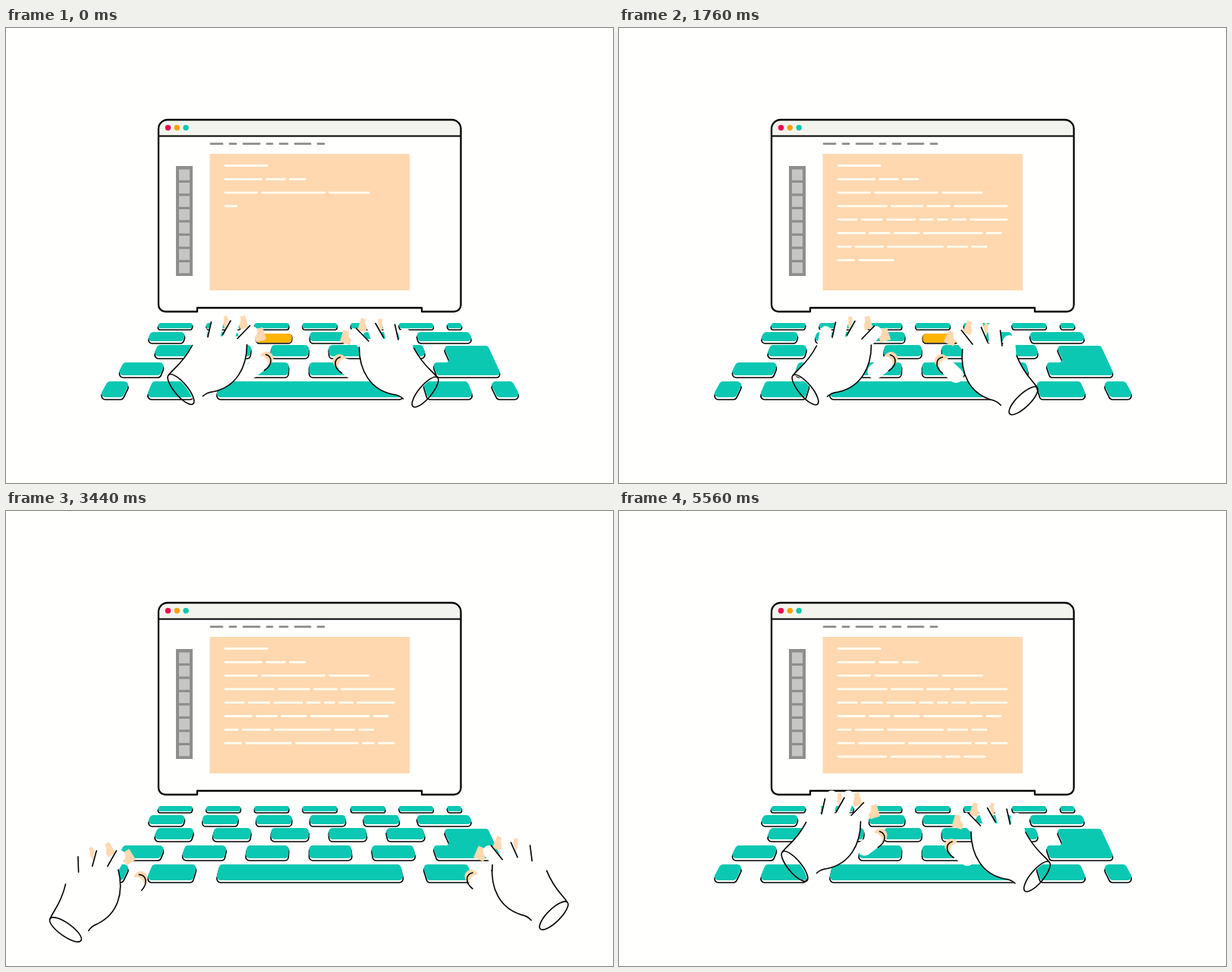
An HTML page with a canvas that plays this animation: 800x600 px, repeating every 5.6 s.

```html
<!DOCTYPE html>
<html lang="en">
<head>
<meta charset="utf-8">
<title>Typing hands</title>
<style>
html, body { margin: 0; width: 100%; height: 100%; overflow: hidden; background: #fffffd; }
canvas { display: block; }
</style>
</head>
<body>
<canvas id="stage" width="800" height="600"></canvas>
<script>
const ctx = document.getElementById('stage').getContext('2d');
const LOOP = 5600;
const PAPER = '#fffffd', INK = '#000', TEAL = '#0ac8b2', AMBER = '#ffb400';
const PEACH = '#ffd8b0', GREY = '#8e8e8c', SILVER = '#c6c6c4', MIST = '#f4f4ee';

// Letter rows: evenly spaced keys, the last one ends at `right`
const rows = [
  { top: 389, bottom: 398, left: 202, pitch: 63, width: 45, count: 7, right: 599 },
  { top: 401, bottom: 416, left: 191, pitch: 69.8, width: 46.5, count: 6, right: 610 },
  { top: 418, bottom: 436, left: 200, pitch: 75, width: 49, count: 5, right: 549 },
  { top: 441, bottom: 461, left: 155, pitch: 81.5, width: 55, count: 5, right: 536 }
];
const presses = [
  { at: 0, row: 1, key: 2 },
  { at: 1000, row: 0, key: 4 },
  { at: 1680, row: 1, key: 3 }
];
const HOLD = 140;

const lineWidths = [57, 107, 191, 224, 224, 216, 197, 224, 195];
const lines = lineWidths.map((width, row) => words(width, row));
const FIRST_TYPED = 3, LAST_LINE = 8;

// Wrist position and turn in degrees for each hand
const awayLeft = [78.5, 552, -14.5], awayRight = [722, 533.5, 5.5];
const poses = [
  { t: 0, hands: [[230.5, 476.5, 0], [552.5, 480, 0]] },
  { t: 1080, hands: [[180, 488, -5], [544, 475, 4]] },
  { t: 1760, hands: [[245.5, 477, 0], [533, 491.5, 6]] },
  { t: 2400, hands: [[209, 500.5, -9], [662.5, 524, 8]] },
  { t: 2900, hands: [awayLeft, awayRight] },
  { t: 3950, hands: [awayLeft, awayRight] },
  { t: 4280, hands: [[200, 468.5, -1], [564, 482.5, -1.5]] },
  { t: 5560, hands: [[231.5, 468.5, 0], [551, 482, 0]] }
];
poses.push({ t: LOOP, hands: poses[0].hands });

const clamp = u => Math.max(0, Math.min(1, u));

function random(seed) {
  const s = Math.sin(seed * 12.9898) * 43758.5453;
  return s - Math.floor(s);
}

// Splits a line into words of varied length
function words(width, row) {
  const list = [];
  for (let x = 0, i = 1; x < width; i++) {
    let end = x + 14 + 72 * random(row * 17 + i) ** 1.6;
    if (end > width - 16) end = width;
    list.push([x, end]);
    x = end + 5;
  }
  return list;
}

// Smooth curve through the poses that never overshoots
function poseValue(t, i, pick) {
  const slope = n => {
    const a = poses[n], b = poses[n + 1];
    return a && b ? (pick(b) - pick(a)) / (b.t - a.t) : 0;
  };
  const tangent = n => {
    const p = slope(n - 1), q = slope(n);
    return p * q > 0 ? 2 * p * q / (p + q) : 0;
  };
  const a = poses[i], b = poses[i + 1], span = b.t - a.t;
  const u = (t - a.t) / span, v = 1 - u;
  return v * v * (1 + 2 * u) * pick(a) + u * u * (3 - 2 * u) * pick(b)
    + span * u * v * (v * tangent(i) - u * tangent(i + 1));
}

function stroke(color, width) {
  ctx.strokeStyle = color;
  ctx.lineWidth = width;
  ctx.stroke();
}

function fill(color) {
  ctx.fillStyle = color;
  ctx.fill();
}

function bar(x1, y1, x2, y2, color, width) {
  ctx.beginPath();
  ctx.moveTo(x1, y1);
  ctx.lineTo(x2, y2);
  stroke(color, width);
}

function dot(x, y, r, color) {
  ctx.beginPath();
  ctx.arc(x, y, r, 0, Math.PI * 2);
  fill(color);
}

function rounded(pts, r) {
  const n = pts.length, last = pts[n - 1], first = pts[0];
  ctx.beginPath();
  ctx.moveTo((last[0] + first[0]) / 2, (last[1] + first[1]) / 2);
  pts.forEach((p, i) => {
    const q = pts[(i + 1) % n];
    ctx.arcTo(p[0], p[1], q[0], q[1], r);
  });
  ctx.closePath();
}

// Keys widen towards the viewer in proportion to their depth
function drawKey(left, right, top, bottom, pressed) {
  const depth = bottom - top, gap = depth < 12 ? 2 : 3;
  const k = 1 + depth * 0.0018, r = Math.min(5, depth * 0.3);
  const out = x => 400 + (x - 400) * k;
  const quad = (y1, y2) => [[left, y1], [right, y1], [out(right), y2], [out(left), y2]];
  rounded(quad(top + gap, bottom), r);
  fill(PAPER);
  stroke(INK, 1.6);
  const sink = pressed ? 2 : 0;
  rounded(quad(top + sink, bottom - gap + sink), r);
  fill(pressed ? AMBER : TEAL);
}

function drawEnter() {
  const shape = (top, bottom) => [[576, top], [635, top], [653, bottom],
    [568, bottom], [562, top + 22], [586, top + 22]];
  rounded(shape(422, 461), 4);
  fill(PAPER);
  stroke(INK, 1.6);
  rounded(shape(419, 458), 4);
  fill(TEAL);
}

function drawKeyboard(t) {
  rows.forEach(({ top, bottom, left, pitch, width, count, right }, row) => {
    for (let i = 0; i < count; i++) {
      const x = left + i * pitch, end = i === count - 1 ? right : x + width;
      const pressed = presses.some(p => p.row === row && p.key === i && t >= p.at && t < p.at + HOLD);
      drawKey(x, end, top, bottom, pressed);
    }
  });
  drawEnter();
  let x = 134;
  for (const width of [30, 59, 238, 59, 30]) {
    drawKey(x, x + width, 466, 490, false);
    x += width + 29.3;
  }
}

function screenPath() {
  ctx.beginPath();
  ctx.moveTo(201, 134);
  ctx.arcTo(201, 121, 220, 121, 12);
  ctx.arcTo(599.5, 121, 599.5, 140, 12);
  ctx.arcTo(599.5, 374, 580, 374, 9);
  ctx.lineTo(548, 374);
  ctx.lineTo(548, 369);
  ctx.lineTo(252, 369);
  ctx.lineTo(252, 374);
  ctx.arcTo(201, 374, 201, 360, 9);
  ctx.closePath();
}

function drawLaptop() {
  screenPath();
  fill(PAPER);
  ctx.save();
  ctx.clip();
  ctx.fillStyle = MIST;
  ctx.fillRect(201, 121, 399, 21);
  ctx.restore();
  screenPath();
  stroke(INK, 2.3);
  bar(201, 142.5, 599, 142.5, INK, 2);
  ['#ee0050', '#ffa000', TEAL].forEach((c, i) => dot(213.5 + i * 11.8, 131.5, 3.7, c));

  let x = 269;
  for (const width of [17, 10, 23, 9, 12, 22, 10]) {
    bar(x + 1, 152.7, x + width - 1, 152.7, GREY, 2.8);
    x += width + 8;
  }

  ctx.fillStyle = GREY;
  ctx.fillRect(224, 182, 22, 145);
  ctx.fillStyle = SILVER;
  for (let i = 0; i < 8; i++) ctx.fillRect(228, 186.5 + i * 17.5, 14, 14.3);

  ctx.fillStyle = PEACH;
  ctx.fillRect(268.5, 166, 263.5, 180);
}

// Writing runs to the line before last, pauses, then adds the last line
function typedWidth(t) {
  const pace = 1 - (1 - clamp(t / 2200)) ** 1.22;
  const body = lineWidths.slice(FIRST_TYPED, LAST_LINE).reduce((a, b) => a + b);
  return 16 + (body - 16) * pace + lineWidths[LAST_LINE] * clamp((t - 4400) / 900);
}

function drawWriting(t) {
  let left = typedWidth(t);
  lines.forEach((line, row) => {
    const end = row < FIRST_TYPED ? Infinity : left;
    const y = 181.5 + row * 17.8;
    for (const [from, to] of line) {
      const stop = Math.min(to, end);
      if (stop - from > 2) bar(289 + from, y, 287 + stop, y, '#fffdf0', 2.8);
    }
    if (row >= FIRST_TYPED) left -= lineWidths[row];
  });
}

function drawFingers() {
  ctx.lineCap = 'butt';
  const tip = i => [27 + 22 * i, -76 - 18.5 * Math.sin(Math.PI * i / 3)];
  for (let i = 1; i < 4; i++) {
    const [x, y] = tip(i);
    bar(x + 8, y - 4, x + 13, y + 12, PEACH, 5 + 3 * i);
  }
  ctx.lineCap = 'round';
  for (let i = 0; i < 4; i++) bar(24 + 18 * i, -60, ...tip(i), PAPER, 16);
}

function drawCreases() {
  for (let i = 0; i < 3; i++) {
    const rise = 4 * Math.sin(Math.PI * i / 2);
    bar(40 + 25.5 * i, -89 - rise + 2.5 * i, 35.5 + 19.5 * i, -69 - rise + i, INK, 1.6);
  }
}

function wristSide() {
  ctx.moveTo(-16, -19);
  ctx.bezierCurveTo(-10, -28, 2, -33, 15, -58);
}

function thumbSide() {
  ctx.bezierCurveTo(87, -28, 72, -3, 43, 3);
  ctx.quadraticCurveTo(34, 4, 29, 9);
}

// Drawn around the middle of the wrist opening; side -1 mirrors it
function drawHand(x, y, turn, side) {
  ctx.save();
  ctx.translate(x, y);
  ctx.rotate(turn * Math.PI / 180);
  ctx.scale(side, 1);

  dot(113, -41, 9, PEACH);
  bar(92, -24, 105, -34, PAPER, 20);
  ctx.beginPath();
  ctx.moveTo(112, -46);
  ctx.bezierCurveTo(121, -43, 121, -32, 110, -25);
  stroke(INK, 1.6);

  drawFingers();

  ctx.beginPath();
  wristSide();
  ctx.lineTo(30, -70);
  ctx.lineTo(78, -70);
  ctx.lineTo(87, -59);
  thumbSide();
  ctx.lineTo(16, 19);
  ctx.bezierCurveTo(18, 8, -2, -18, -16, -19);
  fill(PAPER);

  ctx.beginPath();
  wristSide();
  ctx.moveTo(87, -59);
  thumbSide();
  stroke(INK, 1.6);
  drawCreases();
  ctx.beginPath();
  ctx.ellipse(0, 0, 25, 8.5, 50 * Math.PI / 180, 0, Math.PI * 2);
  stroke(INK, 1.6);
  ctx.restore();
}

function drawHands(t) {
  let i = 0;
  while (t >= poses[i + 1].t) i++;
  const span = poses[i + 1].t - poses[i].t;
  const typing = t < 1760 || t > 4280;
  const beat = Math.PI * Math.round(span / 300) * (t - poses[i].t) / span;
  [1, -1].forEach((side, hand) => {
    const [x, y, turn] = [0, 1, 2].map(n => poseValue(t, i, p => p.hands[hand][n]));
    const tap = typing ? 5 * side * Math.sin(beat) ** 2 : 0;
    drawHand(x, y - tap, turn, side);
  });
}

function draw(now) {
  const t = now % LOOP;
  ctx.fillStyle = PAPER;
  ctx.fillRect(0, 0, 800, 600);
  ctx.lineJoin = ctx.lineCap = 'round';
  drawLaptop();
  drawWriting(t);
  drawKeyboard(t);
  drawHands(t);
  requestAnimationFrame(draw);
}
requestAnimationFrame(draw);
</script>
</body>
</html>
```
